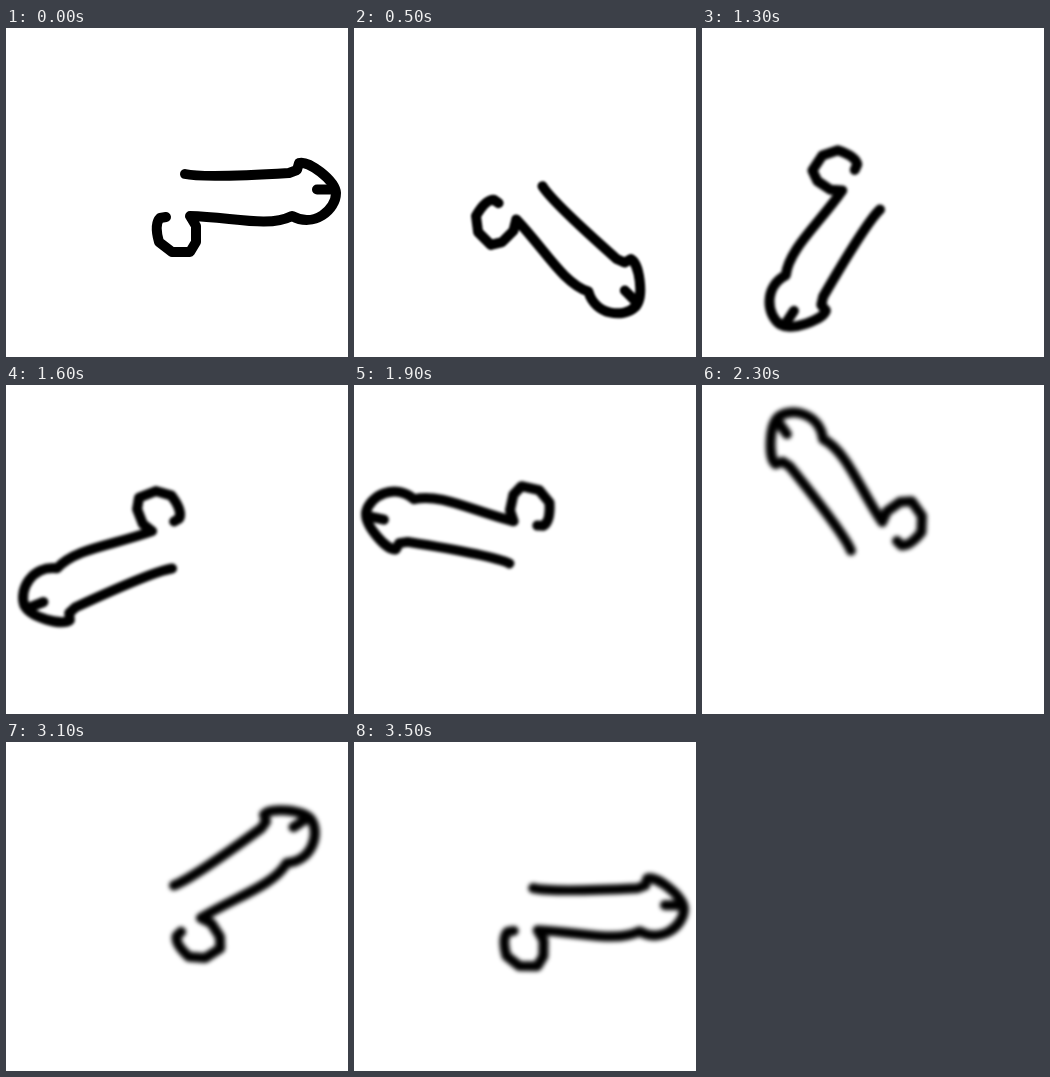
Write an HTML page that moves like this. It is 342 px wide and 329 px high and loops after 3600 ms.

```html
<!DOCTYPE html>
<html lang="en">
<head>
<meta charset="utf-8">
<title>Turning doodle</title>
<style>
  html, body { margin: 0; width: 100%; height: 100%; overflow: hidden; background: #fff; }
  svg { display: block; width: 100%; height: 100%; }
  path { fill: none; stroke: #000; stroke-width: 10; stroke-linecap: round; stroke-linejoin: round; }
</style>
</head>
<body>
<svg viewBox="0 0 342 329">
  <g id="soft">
    <g id="doodle">
      <path d="M179 146C196 150 250 147 283 145L291 142L293 135
        C302 132 329 152 330 165C330 182 308 200 286 188
        C262 200 226 189 184 188L190 198V214L184 224H166L153 214Q148 196 154 190L160 189"/>
      <path d="M311 161.5H325"/>
    </g>
  </g>
</svg>
<script>
  const STEP = 100, LOOP = 3600, SPAN = 6;
  const PIVOT = "169 163.5";
  // degrees reached after every SPAN steps, at an uneven pace
  const turns = [0, 54, 112, 182, 245, 319, 369];
  const soft = document.getElementById("soft");
  const doodle = document.getElementById("doodle");

  function angleAt(step) {
    const i = Math.floor(step / SPAN);
    return turns[i] + (turns[i + 1] - turns[i]) * (step % SPAN) / SPAN;
  }

  let start = null, shown = -1;

  function draw(now) {
    if (start === null) start = now;
    const step = Math.floor(((now - start) % LOOP) / STEP);
    if (step !== shown) {
      shown = step;
      doodle.setAttribute("transform", `rotate(${angleAt(step)} ${PIVOT})`);
      // every turn softens the line a little more
      soft.style.filter = step ? `blur(${0.4 * Math.sqrt(step)}px)` : "none";
    }
    requestAnimationFrame(draw);
  }
  draw(performance.now());
</script>
</body>
</html>
```
